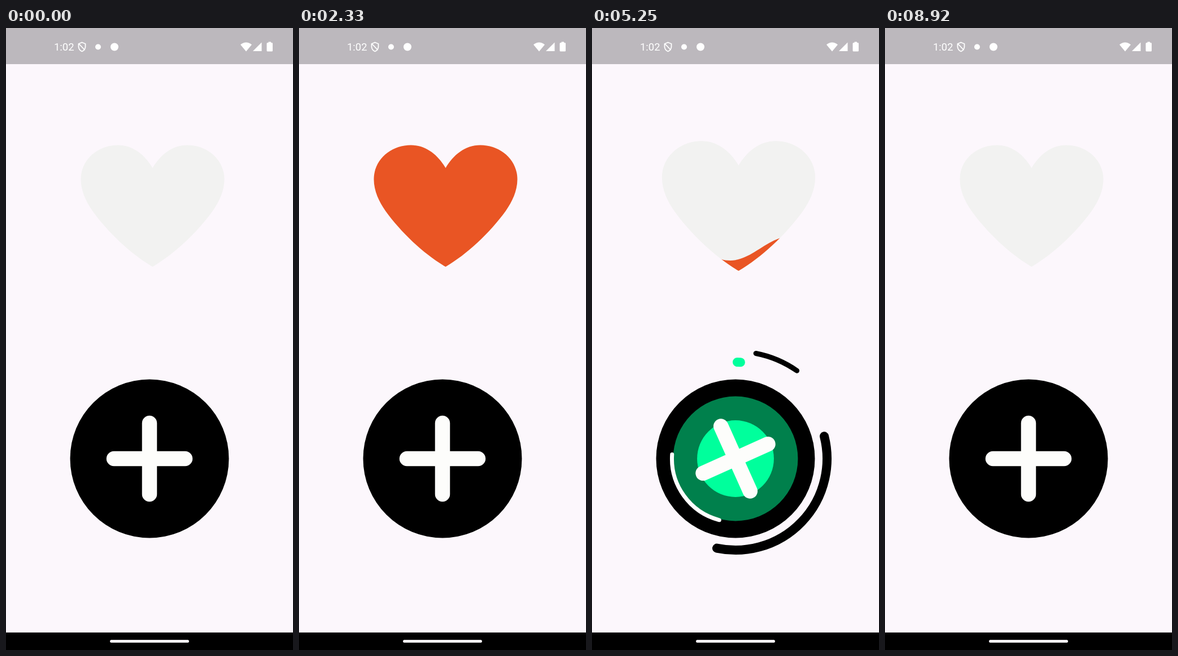
Write an HTML page that moves like this. It is 508 px wide and 1102 px high and loops after 8.96 s.

```html
<!DOCTYPE html>
<html lang="en">
<head>
<meta charset="utf-8">
<title>Heart and plus button</title>
<style>
  html, body { margin: 0; width: 100%; height: 100%; overflow: hidden; background: #fcf7fc; }
  svg { display: block; width: 508px; height: 1102px; }
  .stroke { fill: none; stroke-linecap: round; }
</style>
</head>
<body>
<svg viewBox="0 0 508 1102">
  <defs>
    <path id="heart" d="M259.5 248C246 225 225 207.5 198 207.5C163 207.5 132.5 233 132.5 268C132.5 289 142 308 153 324C182 364 222 401 259.5 423C297 401 337 364 366 324C377 308 386.500 289 386.500 268C386.500 233 356 207.500 321 207.500C294 207.500 273 225 259.500 248Z"/>
    <clipPath id="inside"><use href="#heart"/></clipPath>
  </defs>

  <rect width="508" height="64" fill="#bcb8bd"/>
  <g fill="#fff">
    <text x="85" y="40" font-family="Roboto, sans-serif" font-size="18.4">1:02</text>
    <path class="stroke" stroke="#fff" stroke-width="1.800" d="M134.500 25.500L140.500 28V33.500Q140 39 134.500 41.500Q129 39 128.500 33.500V28ZM129.500 28.500L139 38.500"/>
    <circle cx="163" cy="33.500" r="5"/>
    <circle cx="192" cy="33.500" r="7"/>
    <path d="M415 29.500Q425 21.500 435 29.500L425 41.500Z"/>
    <path d="M452.500 25.500V41H437Z"/>
    <path d="M464.500 24.500H469V26H470.500Q472 26 472 27.500V40Q472 41.500 470.500 41.500H463Q461.500 41.500 461.500 40V27.500Q461.500 26 463 26H464.500Z"/>
  </g>

  <g id="bubbles" fill="#e95524"></g>
  <g id="beat">
    <use href="#heart" fill="#f2f2f1"/>
    <g clip-path="url(#inside)"><path id="liquid" fill="#e95524"/></g>
  </g>

  <g transform="translate(254 763)">
    <circle r="140.500"/>
    <circle id="dark" fill="#00804c"/>
    <circle id="green" fill="#00ff9c"/>
    <g id="arcs"></g>
    <path id="plus" class="stroke" stroke="#fdfdfb" stroke-width="26.500" d="M-63 0H63M0 -63V63"/>
  </g>

  <rect y="1071" width="508" height="31"/>
  <rect x="184" y="1084" width="140" height="5" rx="2.500" fill="#f4f1f4"/>
</svg>
<script>
const LOOP = 8960, HEART = 4100, BUTTON = 10000 / 3, SPIN = 663, SPIN_END = 1550;
const $ = id => document.getElementById(id);
const set = (el, attrs) => { for (const k in attrs) el.setAttribute(k, attrs[k]); };
const add = (parent, tag, attrs) => {
  const el = document.createElementNS('http://www.w3.org/2000/svg', tag);
  set(el, attrs);
  return parent.appendChild(el);
};
const clamp = v => Math.min(1, Math.max(0, v));
const smooth = (t, a, b) => { const u = clamp((t - a) / (b - a)); return u * u * (3 - 2 * u); };

// Monotone cubic through four values, flat at both ends
function track(t, [a, b, c, d], start = 0) {
  const x = [start, 757, 1254, SPIN_END], y = [a, b, c, d];
  if (t <= x[0]) return a;
  if (t >= x[3]) return d;
  const s = [0, 1, 2].map(i => (y[i + 1] - y[i]) / (x[i + 1] - x[i]));
  const mean = (p, q) => p * q > 0 ? 2 * p * q / (p + q) : 0;
  const m = [0, mean(s[0], s[1]), mean(s[1], s[2]), 0];
  const i = t < x[1] ? 0 : t < x[2] ? 1 : 2;
  const h = x[i + 1] - x[i], u = (t - x[i]) / h, v = 1 - u;
  return y[i] * (1 + 2 * u) * v * v + h * m[i] * u * v * v
       + y[i + 1] * u * u * (3 - 2 * u) - h * m[i + 1] * u * u * v;
}

// Arc travelling counter-clockwise from the top, in degrees
function arcPath(r, tail, head) {
  const at = deg => {
    const a = deg * Math.PI / 180;
    return `${(-r * Math.sin(a)).toFixed(2)} ${(-r * Math.cos(a)).toFixed(2)}`;
  };
  return `M${at(tail)}A${r} ${r} 0 ${head - tail > 180 ? 1 : 0} 0 ${at(Math.max(head, tail + 0.1))}`;
}

const arcs = [
  { r: 162, w: 16, color: '#000', start: 150, head: [0, 98, 284, 360], tail: [0, 54, 168, 360] },
  { r: 171, w: 16, color: '#00ff9c', start: 0, head: [3, 296, 359, 360], tail: [2, 185, 357, 360] },
  { r: 190, w: 9, color: '#000', start: 0, head: [0, 217, 349, 360], tail: [0, 113, 325, 360] },
  { r: 112.5, w: 7, color: '#fff', start: 150, head: [0, 41, 165, 360], tail: [0, 24, 86, 360] }
];
for (const a of arcs)
  a.el = add($('arcs'), 'path', { class: 'stroke', stroke: a.color, 'stroke-width': a.w });

// x, y, radius, opacity, rising speed
const bubbles = [
  [191, 186, 9, .75, .07], [221, 212, 9.7, .58, .05], [277, 194, 9.7, .6, .06],
  [312, 183, 9.7, .47, .075], [325, 205, 9, .73, .06]
].map(([x, y, r, alpha, speed]) => ({ x, y, alpha, speed, el: add($('bubbles'), 'circle', { r }) }));

function drawHeart(t) {
  const scale = 1 + .068 * smooth(t, 800, 1150) * (1 - smooth(t, 1150, 1500));
  set($('beat'), { transform: `translate(259.5 315) scale(${scale}) translate(-259.5 -315)` });

  const level = 386 - .194 * (t - 1150), trough = 246 - .77 * (t - 1150);
  let d = 'M110 460';
  for (let x = 110; x <= 410; x += 4)
    d += `L${x} ${(level + 20 * Math.cos((x - trough) * Math.PI / 100)).toFixed(2)}`;
  set($('liquid'), { d: d + 'V460Z', visibility: t > 850 ? 'visible' : 'hidden' });

  const late = t - 3830;
  for (const b of bubbles)
    set(b.el, {
      cx: b.x + .005 * late, cy: b.y - b.speed * late,
      opacity: t > 2600 ? clamp(b.alpha - .00024 * late) : 0
    });
}

function drawButton(t) {
  const s = t - SPIN, spinning = s > 0 && s < SPIN_END;
  set($('green'), { r: s < 0 ? 143 * smooth(t, 100, 480) : track(s, [143, 105, 68, 0]) });
  set($('dark'), { r: s < 0 ? 0 : track(s, [143, 128, 110.5, 0]) });
  set($('plus'), { transform: `rotate(${-track(s, [0, 138, 294, 360])})` });
  for (const a of arcs)
    set(a.el, {
      d: arcPath(a.r, track(s, a.tail, a.start), track(s, a.head, a.start)),
      visibility: spinning && s > a.start ? 'visible' : 'hidden'
    });
}

const begin = performance.now();
function frame() {
  const t = (performance.now() - begin) % LOOP;
  drawHeart(t % HEART);
  drawButton(t % BUTTON);
  requestAnimationFrame(frame);
}
frame();
</script>
</body>
</html>
```
